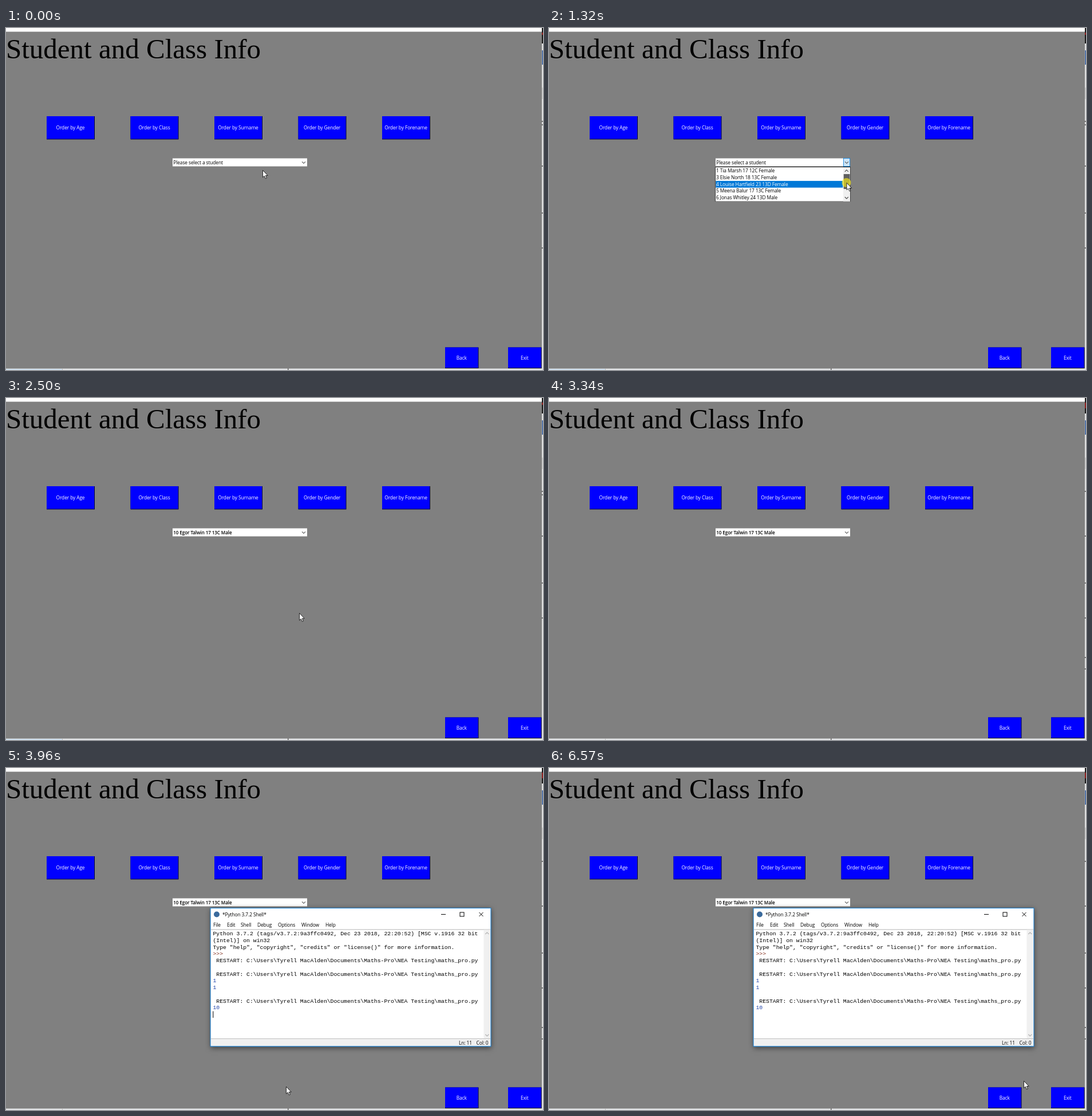
An HTML page with a canvas that plays this animation: 938x597 px, repeating every 6.62 s.

```html
<!DOCTYPE html>
<html lang="en">
<head>
<meta charset="utf-8">
<title>Student and Class Info</title>
<style>
html, body { margin: 0; width: 100%; height: 100%; overflow: hidden; background: #808080; }
canvas { display: block; width: 938px; height: 597px; }
</style>
</head>
<body>
<canvas id="stage" width="938" height="597"></canvas>
<script>
const ctx = document.getElementById('stage').getContext('2d');
const LOOP = 6620;
const UI = '8.4px "Open Sans", "Noto Sans", sans-serif';
const UI_BOLD = '600 8.1px "Open Sans", "Noto Sans", sans-serif';
const MONO = '9.777px "Liberation Mono", monospace';
const TITLE = '49px "Liberation Serif", serif';

const prompt = 'Please select a student';
const students = [
  '1 Tia Marsh 17 12C Female',
  '3 Elsie North 18 13C Female',
  '4 Louise Hartfield 23 13D Female',
  '5 Meena Balur 17 13C Female',
  '6 Jonas Whitley 24 13D Male',
  '7 Rory Dunhaven 16 12C Male',
  '8 Otis Fenner 18 12D Male',
  '9 Quitewideforename Somebiglastnames 18 12D Male',
  '10 Egor Talwin 17 13C Male'
];
const restart = ' RESTART: C:\\Users\\Tyrell MacAlden\\Documents\\Maths-Pro\\NEA Testing\\maths_pro.py';
const shellLines = [
  'Python 3.7.2 (tags/v3.7.2:9a3ffc0492, Dec 23 2018, 22:20:52) [MSC v.1916 32 bit',
  '(Intel)] on win32',
  'Type "help", "copyright", "credits" or "license()" for more information.',
  '>>>', restart, '', restart, '1', '1', '', restart, '10'
];

// Pointer moves: start, end, steps, target x, target y
const moves = [
  [70, 240, 3, 515, 234], [680, 920, 4, 508, 271], [1000, 1090, 2, 518, 268],
  [1320, 1320, 1, 519.5, 270], [1400, 1650, 4, 522, 284], [1800, 1870, 2, 506, 292],
  [1960, 1960, 1, 495, 293], [2200, 2370, 3, 488, 292], [2500, 2640, 3, 560, 542],
  [2960, 2960, 1, 420, 542], [3110, 3110, 1, 423, 549], [3170, 3170, 1, 425, 600],
  [3650, 3800, 3, 489, 556], [4190, 4420, 4, 613, 534], [4570, 4820, 4, 798, 573],
  [5130, 5130, 1, 637, 408], [5210, 5290, 2, 473, 264], [5520, 5600, 2, 520, 236],
  [5680, 6000, 5, 728, 455], [6220, 6570, 5, 829, 546]
];
const presses = [[390, 450], [1320, 1800], [2030, 2200], [3880, 3960]];

const within = (t, a, b) => t >= a && t < b;

function stepsDone(t, start, end, n) {
  if (t < start) return 0;
  return n === 1 ? 1 : Math.min(n, Math.floor((t - start) / (end - start) * (n - 1) + 1e-6) + 1);
}

function pointerAt(t) {
  let x = 448, y = 248;
  for (const [start, end, n, tx, ty] of moves) {
    const k = stepsDone(t, start, end, n) / n;
    x += (tx - x) * k;
    y += (ty - y) * k;
    if (k < 1) break;
  }
  return [x, y];
}

function rect(x, y, w, h, color) {
  ctx.fillStyle = color;
  ctx.fillRect(x, y, w, h);
}

function dot(x, y, r, color) {
  ctx.fillStyle = color;
  ctx.beginPath();
  ctx.arc(x, y, r, 0, Math.PI * 2);
  ctx.fill();
}

function line(points, color, width = 1) {
  ctx.strokeStyle = color;
  ctx.lineWidth = width;
  ctx.beginPath();
  points.forEach(([x, y], i) => i ? ctx.lineTo(x, y) : ctx.moveTo(x, y));
  ctx.stroke();
}

function text(str, x, y, color = '#000', font = UI, align = 'left') {
  ctx.font = font;
  ctx.letterSpacing = font === UI || font === UI_BOLD ? '-0.1px' : '0px';
  ctx.textAlign = align;
  ctx.fillStyle = color;
  ctx.fillText(str, x, y);
}

// Small arrow head: dir 1 points down, -1 points up
function chevron(x, y, dir, color) {
  line([[x - 3, y - 1.5 * dir], [x, y + 1.5 * dir], [x + 3, y - 1.5 * dir]], color, 1.1);
}

function button(label, x, y, w, h) {
  rect(x, y, w, h, '#00003c');
  rect(x, y, w - 1, h - 1, '#00f');
  text(label, x + w / 2 - 0.5, y + h / 2 + 3, '#fff', UI, 'center');
}

function drawApp(value, hover) {
  rect(0, 6.5, 936, 587.5, '#808080');
  text('Student and Class Info', 0, 52.5, '#000', TITLE);
  ['Age', 'Class', 'Surname', 'Gender', 'Forename'].forEach((key, i) =>
    button('Order by ' + key, 71 + i * 146.5, 154, 84, 40.5));
  button('Back', 767, 557.5, 58.5, 36.5);
  button('Exit', 877, 557.5, 58.5, 36.5);

  rect(291, 227.5, 235, 14, '#fff');
  text(value, 292.3, 237.5, '#000', value === prompt ? UI : UI_BOLD);
  if (hover) {
    rect(514, 227, 12, 15, '#0078d7');
    rect(514.8, 227.8, 10.4, 13.4, '#cce4f7');
  }
  chevron(520, 234.8, 1, '#555');
}

function drawEdges(t) {
  rect(0, 0, 938, 7, '#fdfdfd');
  rect(0, 594, 938, 3, '#e2e4e6');
  rect(0, 594, 938, 1, '#b0b0b0');
  if (t < 3340) rect(0, 595, 98, 2, '#cfe0ee');
  rect(98, 595, 1, 2, '#bbb');
  rect(492, 594, 1.5, 3, '#666');
  rect(936, 0, 2, 597, '#e2e2e2');
  rect(936, 0, 2, 27, '#1c1c1c');
  rect(936, 8, 2, t < 3340 ? 4 : 10, '#8c2020');
  rect(936.5, 39, 1.5, 25, '#2b579a');
  rect(936, 104, 2, 20, '#d0d0d0');
  const marks = t < 3340 ? [162, 168, 240, 322, 383] : [162, 240, 322, 383, 452, 472];
  marks.forEach(y => rect(936, y, 1.5, 2, '#555'));
}

function drawList(scroll, selected, dragging) {
  rect(290.5, 242, 236, 61, '#000');
  rect(291, 243, 235, 59.6, '#fff');
  for (let i = 0; i < 5; i++) {
    const item = scroll + i, y = 243.4 + i * 11.75, on = item === selected;
    if (on) rect(291.3, y, 222, 11.75, '#0078d7');
    text(students[item], 292, y + 8.8, on ? '#fff' : '#000');
  }
  rect(514, 243, 12, 59.6, '#f0f0f0');
  chevron(519.8, 249.3, -1, '#505050');
  chevron(519.8, 296.5, 1, '#505050');
  rect(514.7, 255 + scroll * 2.5, 10.8, 26, dragging ? '#606060' : '#cdcdcd');
}

// Menu bar, text area and status bar
function drawShellBody() {
  rect(358, 266, 488, 219, '#fff');
  const menu = { File: 362, Edit: 386, Shell: 410, Debug: 439, Options: 475, Window: 516, Help: 558 };
  for (const name in menu) text(name, menu[name], 277);
  rect(358, 281.5, 488, 1, '#b4b4b4');
  rect(834.5, 282.5, 11.5, 190, '#f0f0f0');
  chevron(840.3, 288.5, -1, '#b0b0b0');
  chevron(840.3, 466.5, 1, '#b0b0b0');
  shellLines.forEach((str, i) => {
    const color = str === '>>>' ? '#8a3a2a' : /^\d+$/.test(str) ? '#1c3fa8' : '#000';
    text(str, 361.5, 292 + i * 11.75, color, MONO);
  });
  rect(358, 472, 488, 13, '#f0f0f0');
  rect(358, 472, 488, 0.8, '#b4b4b4');
  text('Ln: 11', 791, 482.5);
  text('Col: 0', 821.5, 482.5);
}

function drawShell(caret) {
  ctx.save();
  ctx.shadowColor = 'rgba(0,0,0,.5)';
  ctx.shadowBlur = 9;
  ctx.shadowOffsetY = 2;
  rect(356.5, 244, 491, 242.5, '#1a7fd0');
  ctx.restore();
  rect(357.6, 245.1, 488.8, 240.2, '#fff');
  dot(368, 255.5, 5, '#3a6a9c');
  text('*Python 3.7.2 Shell*', 378, 258.7);
  line([[760, 255.5], [768, 255.5]], '#000');
  ctx.strokeRect(793, 252, 7, 7);
  line([[826.5, 252], [833.5, 259]], '#000');
  line([[833.5, 252], [826.5, 259]], '#000');
  drawShellBody();
  if (caret) rect(361.3, 424.5, 1, 11.5, '#000');
}

function clipped(x, y, w, h, draw) {
  ctx.save();
  ctx.beginPath();
  ctx.rect(x, y, w, h);
  ctx.clip();
  draw();
  ctx.restore();
}

// Tiny rows of coloured dashes that look like source code
function codePage(x, w, seed, colors) {
  const rnd = () => (seed = seed * 16807 % 2147483647) / 2147483647;
  rect(x, 521, w, 76, '#fff');
  clipped(x, 521, w, 76, () => {
    ctx.globalAlpha = 0.4;
    for (let y = 523; y < 597; y += 2.3) {
      if (rnd() < 0.16) continue;
      let px = x + 3 + Math.floor(rnd() * 4) * 3.5;
      const end = px + w * (0.15 + rnd() * 0.5);
      while (px < end) {
        const len = 2 + rnd() * 8;
        rect(px, y, len, 0.8, colors[Math.floor(rnd() * colors.length)]);
        px += len + 1;
      }
    }
  });
}

function drawThumbs(hover, value) {
  ctx.save();
  ctx.shadowColor = 'rgba(0,0,0,.3)';
  ctx.shadowBlur = 6;
  rect(138, 498, 602, 110, '#424242');
  ctx.restore();
  rect(601, 498, 139, 99, '#505050');
  if (hover) rect(443, 498, 158, 99, '#686868');

  const tabs = [
    [150, 'test_dates.py - C:\\U...'], [262, 'maths_pro.py - ...'],
    [364.5, 'questions_res...'], [455, '*Python 3.7.2 Shell*']
  ];
  tabs.forEach(([x, label]) => {
    dot(x, 510, 5, '#3a6a9c');
    text(label, x + 11.3, 513, '#fff', UI_BOLD);
  });
  dot(613, 510, 4.5, '#2b3a55');
  text('Sums Nook', 625, 513, '#fff', UI_BOLD);
  if (hover) {
    line([[585, 506], [593, 514]], '#fff');
    line([[593, 506], [585, 514]], '#fff');
  }

  codePage(144, 99, 71, ['#555', '#3a9a3a', '#3a9a3a', '#777']);
  codePage(256, 90, 1234, ['#555', '#3a9a3a', '#777', '#c55']);
  codePage(359, 77, 402, ['#e22', '#e22', '#d44', '#3a9a3a', '#777']);
  rect(449, 528, 146, 66, '#fff');
  clipped(449, 528, 146, 66, () => {
    ctx.globalAlpha = 0.75;
    ctx.translate(449, 528);
    ctx.scale(0.298, 0.298);
    ctx.translate(-357.5, -266);
    drawShellBody();
  });
  clipped(607, 521, 127, 76, () => {
    ctx.translate(607, 520.4);
    ctx.scale(0.1362, 0.1362);
    drawApp(value, false);
  });
}

function drawPointer(x, y, beam) {
  if (beam) {
    line([[x, y - 5.5], [x, y + 5.5]], '#000');
    line([[x - 3, y - 5.5], [x + 3, y - 5.5]], '#000');
    line([[x - 3, y + 5.5], [x + 3, y + 5.5]], '#000');
    return;
  }
  ctx.save();
  ctx.translate(x, y);
  ctx.beginPath();
  [[0, 0], [0, 12.4], [2.8, 9.9], [4.8, 14.5], [6.8, 13.7], [4.9, 9.2], [8.7, 9.2]]
    .forEach(([px, py]) => ctx.lineTo(px + 0.5, py + 0.3));
  ctx.closePath();
  ctx.fillStyle = '#fff';
  ctx.fill();
  ctx.strokeStyle = '#000';
  ctx.lineWidth = 0.8;
  ctx.stroke();
  ctx.restore();
}

function draw(t) {
  const value = t < 2110 ? prompt : students[8];
  const shellOpen = t >= 3960;
  const [x, y] = pointerAt(t);
  drawEdges(t);
  drawApp(value, within(t, 150, 2110));

  if (within(t, 390, 2110)) {
    const selected = t < 760 ? -1 : t < 840 ? 0 : t < 920 ? 1 : t < 1870 ? 2 : 8;
    drawList(stepsDone(t, 1400, 1650, 4), selected, within(t, 1320, 1800));
  }
  if (within(t, 3480, 3960)) drawThumbs(t >= 3720, value);
  if (shellOpen) {
    const blink = ((t - 4900) % 900 + 900) % 900;
    drawShell(t < 4570 || blink < 610 && t >= 4900);
  }

  if (presses.some(([a, b]) => within(t, a, b))) dot(x, y, 8, 'rgba(255,242,20,.62)');
  drawPointer(x, y, shellOpen && within(x, 358, 834) && within(y, 282, 472));
}

const begin = performance.now();
function tick() {
  draw((performance.now() - begin) % LOOP);
  requestAnimationFrame(tick);
}
tick();
</script>
</body>
</html>
```
